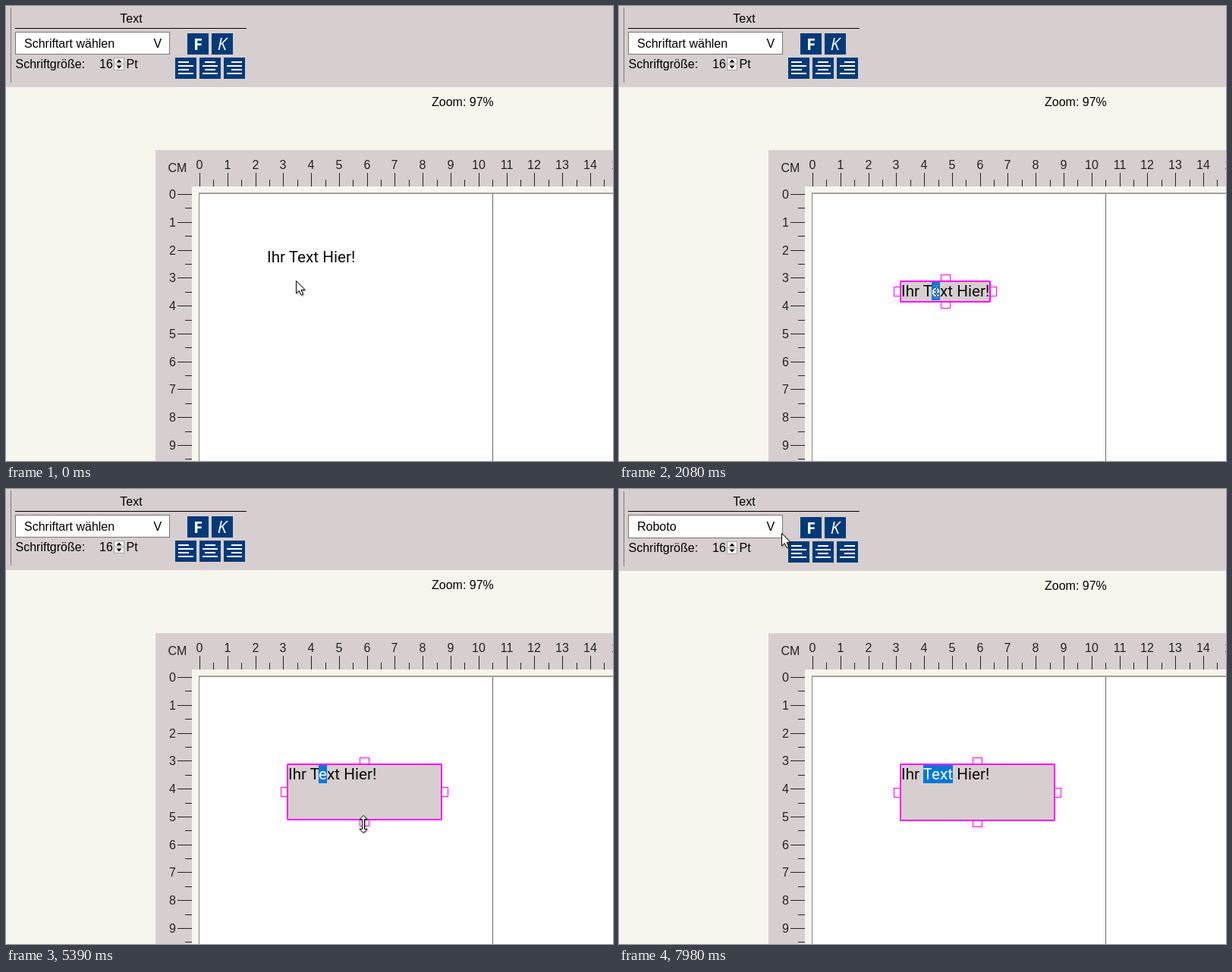
Write an HTML page that moves like this. It is 800 px wide and 600 px high and loops after 8 s.

```html
<!DOCTYPE html>
<html lang="de">
<head>
<meta charset="utf-8">
<title>Textfeld bearbeiten</title>
<style>
html, body { margin: 0; width: 100%; height: 100%; overflow: hidden; background: #f7f6ee; }
body { position: relative; }
#scene { position: absolute; left: 0; top: 0; font: 16px "Liberation Sans", Arial, sans-serif; }
#scene rect, #scene line { shape-rendering: crispEdges; }
.panel { fill: #d7cfcf; }
.navy { fill: #003a78; }
.icon { font: 22px "Open Sans", sans-serif; fill: #fff; text-anchor: middle; }
.ruler { fill: #222; }
.ruler line { stroke: #222; }

/* toolbar reacts once the selected font is known */
.low { animation: nudge 8s step-end infinite; }
#select { animation: stretch 8s step-end infinite; }
#before { animation: before 8s step-end infinite; }
#after { opacity: 0; animation: after 8s step-end infinite; }
@keyframes nudge { 91.6%, 100% { transform: translateY(1px); } }
@keyframes stretch { 91.6%, 100% { height: 30px; } }
@keyframes before { 91.6%, 100% { opacity: 0; } }
@keyframes after { 91.6%, 100% { opacity: 1; } }

/* text box */
#box {
  position: absolute; left: 342px; top: 317px; width: 120px; height: 29px;
  animation: drag 8s linear infinite, size 8s ease-in-out infinite;
}
#frame {
  position: absolute; inset: 0; box-sizing: border-box;
  border: 2px solid #f0f; border-radius: 2px; background: #d7cfcf;
  animation: show 8s step-end infinite, hover 8s step-end infinite;
}
#frame i {
  position: absolute; box-sizing: border-box; width: 13px; height: 9px;
  border: 1px solid #f0f; background: #fff;
}
#frame .n { left: calc(50% - 6.5px); top: -10px; }
#frame .s { left: calc(50% - 6.5px); bottom: -10px; }
#frame .w, #frame .e { width: 9px; height: 13px; top: calc(50% - 6.5px); }
#frame .w { left: -10px; }
#frame .e { right: -10px; }
#label {
  position: absolute; left: 2px; top: 2px; white-space: nowrap;
  font: 20.69px/25px Roboto, sans-serif; color: #0a0a0a;
}
#label span { animation: 8s step-end infinite; }
#label .l1 { animation-name: pick1; }
#label .l2 { animation-name: pick2; }
#label .l3 { animation-name: pick3; }
#label .l4 { animation-name: pick4; }
@keyframes pick1 { 81.9%, 100% { background: #0078d7; color: #fff; } }
@keyframes pick2 {
  12.2%, 83%, 100% { background: #0078d7; color: #fff; }
  80.2% { background: #0078d700; color: #0a0a0a; }
}
@keyframes pick3 { 84.3%, 100% { background: #0078d7; color: #fff; } }
@keyframes pick4 { 85.2%, 100% { background: #0078d7; color: #fff; } }
@keyframes show { 0% { opacity: 0; } 12.2%, 100% { opacity: 1; } }
@keyframes hover {
  0%, 36.9%, 59.2%, 74.5%, 100% { background-color: #d7cfcf; }
  34.9%, 49.6%, 70.2% { background-color: #fff; }
}
@keyframes drag {
  0%, 12.6% { left: 342px; top: 317px; }
  15.9% { left: 395px; top: 325px; }
  17.25% { left: 415px; top: 331px; }
  19.25% { left: 407px; top: 345px; }
  21.75% { left: 382px; top: 360px; }
  24% { left: 372px; top: 366px; }
  25.9%, 100% { left: 370px; top: 362px; }
}
@keyframes size {
  0%, 44.8% { width: 120px; height: 29px; }
  49.1%, 61.5% { width: 205px; height: 29px; }
  68%, 100% { width: 205px; height: 76px; }
}

/* click marker */
#press {
  position: absolute; left: -10px; top: -10px; width: 20px; height: 20px; border-radius: 50%;
  background: radial-gradient(closest-side, #ff5a4a, #ee1c1c 45%, #d81010 62%, #f5a0a0cc 74%, #c98a8a88 90%, #c98a8a00);
  animation: press 8s linear infinite;
}
@keyframes press {
  0%, 12.2% { opacity: 0; transform: translate(390px, 332px) scale(.4); }
  12.21% { opacity: 1; transform: translate(390px, 332px) scale(.4); }
  13.7%, 16.4% { opacity: 1; transform: translate(390px, 332px); }
  19% { opacity: 0; transform: translate(390px, 332px); }
  43.9% { opacity: 0; transform: translate(494px, 376px) scale(.4); }
  43.91% { opacity: 1; transform: translate(494px, 376px) scale(.4); }
  45.4%, 48% { opacity: 1; transform: translate(494px, 376px); }
  50.5% { opacity: 0; transform: translate(494px, 376px); }
  60.3% { opacity: 0; transform: translate(471px, 394px) scale(.4); }
  60.31% { opacity: 1; transform: translate(471px, 394px) scale(.4); }
  61.8%, 64.5% { opacity: 1; transform: translate(471px, 394px); }
  67% { opacity: 0; transform: translate(471px, 394px); }
  80.2% { opacity: 0; transform: translate(402px, 381px) scale(.4); }
  80.21% { opacity: 1; transform: translate(402px, 381px) scale(.4); }
  81.7%, 84.4% { opacity: 1; transform: translate(402px, 381px); }
  87%, 100% { opacity: 0; transform: translate(402px, 381px); }
}

/* pointer: one path, five shapes */
.cursor {
  position: absolute; left: -25px; top: -25px; opacity: 0;
  fill: #fff; stroke: #000; animation: path 8s linear infinite, 8s step-end infinite;
  filter: drop-shadow(1.5px 1.5px 1px #0006);
}
#arrow { animation-name: path, arrow; }
#beam { animation-name: path, beam; filter: none; stroke: #fff; fill: none; mix-blend-mode: difference; }
#move { animation-name: path, move; }
#ew { animation-name: path, ew; }
#ns { animation-name: path, ns; }
@keyframes arrow {
  0%, 34.9%, 49.6%, 70.2%, 92.9%, 100% { opacity: 1; }
  7.1%, 36.9%, 59.2%, 74.5% { opacity: 0; }
}
@keyframes beam {
  0%, 12.2%, 34.9%, 92.9%, 100% { opacity: 0; }
  7.1%, 25.9%, 74.5% { opacity: 1; }
}
@keyframes move { 0%, 25.9%, 100% { opacity: 0; } 12.2% { opacity: 1; } }
@keyframes ew { 0%, 49.6%, 100% { opacity: 0; } 36.9% { opacity: 1; } }
@keyframes ns { 0%, 70.2%, 100% { opacity: 0; } 59.2% { opacity: 1; } }
@keyframes path {
  0% { transform: translate(382px, 362px); }
  2% { transform: translate(382px, 362px); animation-timing-function: ease-in-out; }
  11.5%, 12.2% { transform: translate(390px, 332px); }
  15.9% { transform: translate(452px, 343px); }
  16.8% { transform: translate(463px, 346px); }
  18.75% { transform: translate(455px, 360px); }
  21.25% { transform: translate(430px, 375px); }
  23.5% { transform: translate(420px, 381px); }
  25.8% { transform: translate(418px, 377px); }
  28.9% { transform: translate(418px, 377px); animation-timing-function: ease-in-out; }
  35.4% { transform: translate(503px, 377px); }
  38.8% { transform: translate(495px, 376px); }
  44.3% { transform: translate(496px, 376px); animation-timing-function: ease-in-out; }
  48.7% { transform: translate(579px, 376px); }
  49.4% { transform: translate(579px, 376px); animation-timing-function: ease-in-out; }
  55% { transform: translate(490px, 401px); }
  58.4% { transform: translate(467px, 399px); }
  59.4% { transform: translate(471px, 394px); }
  61% { transform: translate(471px, 394px); animation-timing-function: ease-in-out; }
  67.5%, 70% { transform: translate(471px, 442px); }
  72.6% { transform: translate(468px, 484px); animation-timing-function: ease-in-out; }
  76.2% { transform: translate(403px, 382px); }
  81.25% { transform: translate(402px, 381px); }
  85.6%, 88.1% { transform: translate(441px, 382px); }
  91.4% { transform: translate(441px, 382px); animation-timing-function: ease-in-out; }
  99.7%, 100% { transform: translate(214px, 58px); }
}
</style>
</head>
<body>
<svg id="scene" width="800" height="600">
  <rect class="panel low" y="-1" width="800" height="108"/>
  <rect class="low" x="6" y="2" width="1" height="99" fill="#777"/>
  <text x="165" y="22" text-anchor="middle">Text</text>
  <rect x="12" y="29" width="305" height="1"/>
  <rect id="select" x="12.5" y="34.5" width="203" height="29" fill="#fff" stroke="#767676"/>
  <text id="before" x="24" y="55">Schriftart wählen</text>
  <text id="after" x="24" y="55">Roboto</text>
  <text x="194.5" y="55">V</text>
  <g class="low">
    <text x="12.5" y="82">Schriftgröße:</text>
    <text x="123" y="82">16</text>
    <text x="158.5" y="82">Pt</text>
    <rect x="142.5" y="68.5" width="13" height="16" fill="#f2f2f2" stroke="#a8a8a8"/>
    <line x1="142" x2="156" y1="76.5" y2="76.5" stroke="#a8a8a8"/>
    <path d="M145.500 74.500l3.500-4 3.500 4zM145.500 78.500l3.500 4 3.500-4z"/>
    <rect class="navy" x="239" y="36" width="28" height="28"/>
    <rect class="navy" x="271" y="36" width="28" height="28"/>
    <text class="icon" x="253" y="58" font-weight="700" style="font-weight:700">F</text>
    <text class="icon" x="285" y="58" style="font-style:italic">K</text>
    <g id="aligns"></g>
    <text x="561" y="132">Zoom: 97%</text>
  </g>
  <path class="panel" d="M197 190H800V238H245V600H197z"/>
  <rect x="254" y="247" width="546" height="353" fill="#fff"/>
  <rect x="254" y="246" width="546" height="2" fill="#a69e9b"/>
  <rect x="254" y="247" width="1" height="353" fill="#85857c"/>
  <rect x="641" y="248" width="1" height="352" fill="#666"/>
  <g class="ruler" id="ruler"><text x="213.500" y="219">CM</text></g>
</svg>

<div id="box">
  <div id="frame"><i class="n"></i><i class="s"></i><i class="w"></i><i class="e"></i></div>
  <div id="label">Ihr <span class="l1">T</span><span class="l2">e</span><span class="l3">x</span><span class="l4">t</span> Hier!</div>
</div>
<div id="press"></div>

<svg class="cursor" id="arrow" width="50" height="50" viewBox="-25 -25 50 50"><path d="M.5 .5V17L4.300 13.400 7 19.300 9.600 18.200 7 12.400H12z"/></svg>
<svg class="cursor" id="beam" width="50" height="50" viewBox="-25 -25 50 50"><path d="M-3-8.500H-1M1-8.500H3M-3 7.500H-1M1 7.500H3M0-8V7" shape-rendering="crispEdges"/></svg>
<svg class="cursor" id="move" width="50" height="50" viewBox="-25 -25 50 50"><path d="M0-10.500L4-6.500H1.500V-1.500H6.500V-4L10.500 0 6.500 4V1.500H1.500V6.500H4L0 10.500-4 6.500H-1.500V1.500H-6.500V4L-10.500 0-6.500-4V-1.500H-1.500V-6.500H-4z"/></svg>
<svg class="cursor" id="ew" width="50" height="50" viewBox="-25 -25 50 50"><path id="double" d="M-11.500 0L-6.500-5V-1.500H6.500V-5L11.500 0 6.500 5V1.500H-6.500V5z"/></svg>
<svg class="cursor" id="ns" width="50" height="50" viewBox="-25 -25 50 50"><use href="#double" transform="rotate(90)"/></svg>

<script>
const ruler = document.getElementById('ruler');
const aligns = document.getElementById('aligns');

function add(parent, tag, attrs, text = '') {
  const el = document.createElementNS('http://www.w3.org/2000/svg', tag);
  for (const key in attrs) el.setAttribute(key, attrs[key]);
  el.textContent = text;
  parent.append(el);
}

const CM = 36.78;
for (let half = 0; half < 31; half++) {
  const major = half % 2 === 0;
  const x = Math.round(255 + half * CM / 2) + .5;
  const y = Math.round(248 + half * CM / 2) + .5;
  add(ruler, 'line', { x1: x, x2: x, y1: major ? 220 : 229, y2: 238 });
  add(ruler, 'line', { x1: major ? 226 : 236, x2: 245, y1: y, y2: y });
  if (major) {
    add(ruler, 'text', { x: x - .5, y: 215, 'text-anchor': 'middle' }, half / 2);
    add(ruler, 'text', { x: 224, y: y + 5.5, 'text-anchor': 'end' }, half / 2);
  }
}

// left, centred and right aligned line icons
for (let i = 0; i < 3; i++) {
  const x = 223 + i * 32;
  add(aligns, 'rect', { class: 'navy', x, y: 68, width: 28, height: 28 });
  for (let row = 0; row < 4; row++) {
    const width = row % 2 ? 20 : 14;
    add(aligns, 'rect', { x: x + 4 + (20 - width) * i / 2, y: 73 + row * 5, width, height: 2, fill: '#fff' });
  }
}
</script>
</body>
</html>
```
